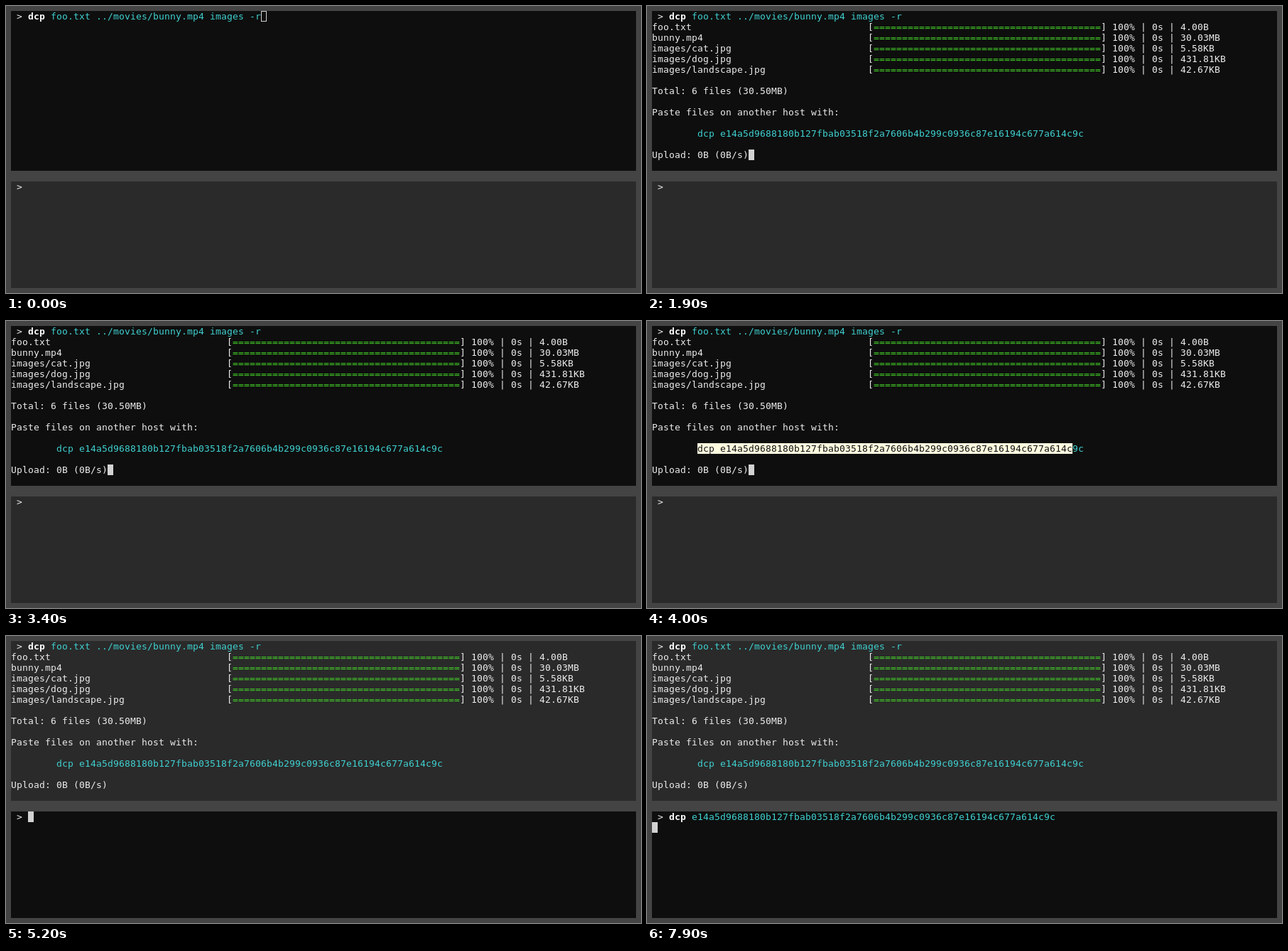
An HTML page that plays this animation: 894 px wide and 404 px high, repeating every 8 s.

```html
<!DOCTYPE html>
<html lang="en">
<head>
<meta charset="utf-8">
<title>Terminal copy between two panes</title>
<style>
  html, body { margin: 0; width: 100%; height: 100%; overflow: hidden; background: #444; }

  /* Character cell: 8 x 15 px */
  .pane {
    position: absolute; left: 7px; width: 880px; overflow: hidden;
    font: 13px/15px "DejaVu Sans Mono", monospace; letter-spacing: calc(8px - 1ch);
    color: #ececec; background: #2a2a2a;
  }
  #top { top: 7px; height: 225px; animation: top-pane 8s step-end infinite; }
  #bottom { top: 247px; height: 150px; animation: bottom-pane 8s step-end infinite; }

  pre { position: absolute; left: 0; margin: 0; font: inherit; }
  b { color: #fff; }
  i { font-style: normal; color: #40d0d0; }
  u { text-decoration: none; color: #42c828; }

  #files { top: 15px; animation: files 8s step-end infinite; }
  #summary { top: 105px; animation: summary 8s step-end infinite; }
  #paste { top: 0; left: 24px; animation: paste 8s step-end infinite; }

  #selection {
    top: 165px; left: 64px; width: 0; overflow: hidden;
    color: #101010; background: #fffbdf;
    animation: select 8s step-end infinite;
  }

  .cursor {
    position: absolute; box-sizing: border-box; width: 8px; height: 15px;
    border: 1px solid #d2d2d2;
  }
  #top .cursor { animation: top-cursor 8s step-end infinite; }
  #bottom .cursor { background: #d2d2d2; animation: bottom-cursor 8s step-end infinite; }

  @keyframes top-pane { 0% { background: #0e0e0e; } 65%, 100% { background: #2a2a2a; } }
  @keyframes bottom-pane { 0% { background: #2a2a2a; } 65%, 100% { background: #0e0e0e; } }
  @keyframes files { 0% { visibility: hidden; } 21.25%, 100% { visibility: visible; } }
  @keyframes summary { 0% { visibility: hidden; } 22.5%, 100% { visibility: visible; } }
  @keyframes paste { 0% { visibility: hidden; } 83.75%, 100% { visibility: visible; } }

  @keyframes select {
    0% { width: 0; }
    43.75% { width: 40px; }
    45% { width: 144px; }
    46.25% { width: 272px; }
    47.5% { width: 384px; }
    48.75% { width: 480px; }
    50% { width: 528px; }
    51.25% { width: 544px; }
    65%, 100% { width: 0; }
  }

  @keyframes top-cursor {
    0% { left: 352px; top: 0; background: transparent; visibility: visible; }
    1.25% { left: 352px; top: 0; background: #d2d2d2; visibility: visible; }
    10% { left: 0; top: 15px; background: #d2d2d2; visibility: visible; }
    18.75% { left: 0; top: 15px; background: #d2d2d2; visibility: hidden; }
    22.5% { left: 136px; top: 195px; background: #d2d2d2; visibility: visible; }
    65%, 100% { left: 136px; top: 195px; background: #d2d2d2; visibility: hidden; }
  }
  @keyframes bottom-cursor {
    0% { left: 24px; top: 0; visibility: hidden; }
    65% { left: 24px; top: 0; visibility: visible; }
    83.75% { left: 568px; top: 0; visibility: visible; }
    90%, 100% { left: 0; top: 15px; visibility: visible; }
  }
</style>
</head>
<body>
<div class="pane" id="top">
  <pre> &gt; <b>dcp</b> <i>foo.txt ../movies/bunny.mp4 images -r</i></pre>
  <pre id="files"></pre>
  <pre id="summary">Total: 6 files (30.50MB)

Paste files on another host with:

        <i>dcp <span class="hash"></span></i>

Upload: 0B (0B/s)</pre>
  <pre id="selection" aria-hidden="true">dcp <span class="hash"></span></pre>
  <div class="cursor"></div>
</div>
<div class="pane" id="bottom">
  <pre> &gt;</pre>
  <pre id="paste"><b>dcp</b> <i class="hash"></i></pre>
  <div class="cursor"></div>
</div>
<script>
  const hash = 'e14a5d9688180b127fbab03518f2a7606b4b299c0936c87e16194c677a614c9c';
  document.querySelectorAll('.hash').forEach(el => { el.textContent = hash; });

  const files = [
    ['foo.txt', '4.00B'],
    ['bunny.mp4', '30.03MB'],
    ['images/cat.jpg', '5.58KB'],
    ['images/dog.jpg', '431.81KB'],
    ['images/landscape.jpg', '42.67KB']
  ];
  const bar = `[<u>${'='.repeat(40)}</u>] 100% | 0s | `;
  document.getElementById('files').innerHTML =
    files.map(([name, size]) => name.padEnd(38) + bar + size).join('\n');
</script>
</body>
</html>
```
